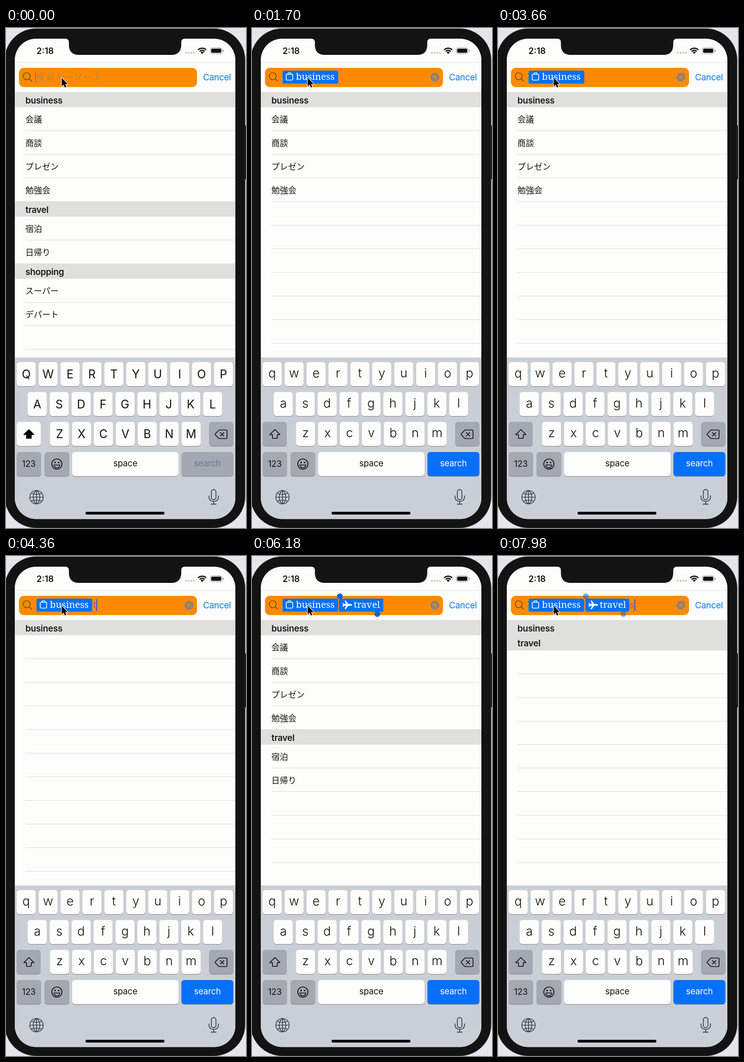
Animation of 519 by 1079 pixels, one loop 8000 ms. Source, as an HTML page with a canvas:

```html
<!DOCTYPE html>
<html lang="ja">
<head>
<meta charset="utf-8">
<title>Search tokens</title>
<style>
html, body { margin: 0; width: 100%; height: 100%; overflow: hidden; background: #e6e6ea; }
canvas { display: block; }
</style>
</head>
<body>
<canvas id="stage" width="519" height="1079"></canvas>
<script>
const c = document.getElementById('stage').getContext('2d');
const LOOP = 8000;
const SANS = 'Inter, Roboto, sans-serif';
const SERIF = '"Noto Serif", serif';
const JP = '"Noto Sans CJK JP", "Noto Sans CJK", sans-serif';
const JP_SERIF = '"Noto Serif CJK JP", "Noto Sans CJK JP", serif';
const BLUE = '#0570fa', INK = '#111', FIELD = '#ff8a00', WHITE = '#fdfdfc';

const sections = {
  business: ['会議', '商談', 'プレゼン', '勉強会'],
  travel: ['宿泊', '日帰り'],
  shopping: ['スーパー', 'デパート']
};

// blink shifts the caret phase; caret is its x position
const states = [
  { at: 0, tokens: [], text: '', caret: 64, blink: 520 },
  { at: 700, tokens: [], text: 'B', textX: 64, caret: 78.5 },
  { at: 1080, tokens: ['business'], text: '', caret: 189 },
  { at: 4000, tokens: ['business'], text: 't', textX: 188, caret: 196 },
  { at: 4450, tokens: ['business', 'travel'], text: '', selected: true },
  { at: 7900, tokens: ['business', 'travel'], text: 's', textX: 285.5, caret: 296, handlesFade: true }
];

function box(x, y, w, h, r, fill) {
  c.beginPath();
  c.roundRect(x, y, w, h, r);
  c.fillStyle = fill;
  c.fill();
}

function disc(x, y, r, fill) {
  c.beginPath();
  c.arc(x, y, r, 0, 7);
  c.fillStyle = fill;
  c.fill();
}

function label(str, x, y, font, fill = INK, align = 'left', spacing = 0) {
  c.font = font;
  c.letterSpacing = spacing + 'px';
  c.textAlign = align;
  c.fillStyle = fill;
  c.fillText(str, x, y);
}

function line(d, color, width = 1.8) {
  c.strokeStyle = color;
  c.lineWidth = width;
  c.stroke(new Path2D(d));
}

function shape(d, fill) {
  c.fillStyle = fill;
  c.fill(new Path2D(d));
}

function phone() {
  c.fillStyle = '#e6e6ea';
  c.fillRect(0, 0, 519, 1079);
  c.fillStyle = '#cfd0d9';
  c.fillRect(0, 8, 519, 1);
  box(510, 210, 9, 117, 2, '#171717');
  box(-3, 1, 520.5, 1078, 68, '#303030');
  box(-2, 2, 518.5, 1076, 67, '#131313');
}

function statusBar() {
  shape('M128 22H387V23Q379 23 379 31V36Q379 58 357 58H158Q136 58 136 36V31Q136 23 128 23Z', '#131313');
  label('2:18', 66, 56, '600 18.5px ' + SANS);
  for (let i = 0; i < 4; i++) disc(389 + i * 5.7, 53.5, 2, '#c4c4c6');
  shape('M424.3 56L420.8 52.4Q424.3 49.6 427.8 52.4Z', INK);
  for (const r of [7.8, 12.4]) {
    c.beginPath();
    c.arc(424.3, 56, r, -Math.PI * 0.75, -Math.PI * 0.25);
    c.strokeStyle = INK;
    c.lineWidth = 2.7;
    c.stroke();
  }
  c.beginPath();
  c.roundRect(441.5, 42.5, 26, 13, 4);
  c.strokeStyle = '#999';
  c.lineWidth = 1;
  c.stroke();
  box(443.5, 44.5, 22, 9, 2.3, INK);
  box(469, 46.8, 1.8, 4.5, 1, '#999');
}

function bag() {
  line('M75.5 100H86.5Q88 100 88 101.5V110Q88 112.5 85.5 112.5H76.5Q74 112.5 74 110V101.5Q74 100 75.5 100ZM77.3 100C77.3 95.4 84.7 95.4 84.7 100', '#fff', 1.6);
}

function plane() {
  shape('M216.5 105.5Q216 103.6 212.5 103.5H208L202.5 96H200.5L203 103.5H199L197.3 101.3H195.8L196.8 105.5L195.8 109.7H197.3L199 107.5H203L200.5 115H202.5L208 107.5H212.5Q216 107.4 216.5 105.5Z', '#fff');
}

const pills = {
  business: { x: 66, w: 120.5, textX: 95, icon: bag },
  travel: { x: 189, w: 95, textX: 220, icon: plane }
};

function caretAlpha(age) {
  const u = age % 1000;
  if (u < 450) return 1;
  if (u < 600) return (600 - u) / 150;
  return Math.max(0, (u - 850) / 150);
}

function handles(alpha) {
  c.globalAlpha = alpha;
  disc(190, 87, 6.3, '#1264d2');
  disc(271, 125, 6.3, '#1264d2');
  c.globalAlpha = 1;
}

function searchField(s, age) {
  c.fillStyle = '#e4e4de';
  c.fillRect(19, 74, 477, 1);
  box(28, 86, 385, 41.5, 10, FIELD);
  line('M52.4 104A7.6 7.6 0 1 1 37.2 104A7.6 7.6 0 1 1 52.4 104M50.2 109.4L56 115.2', '#80500f', 1.9);
  label('Cancel', 426, 112.5, '19px ' + SANS, '#0a7ae6', 'left', -0.35);

  const empty = !s.text && !s.tokens.length;
  if (empty) {
    label('検索キーワード', 64, 112.5, '300 20.5px ' + JP_SERIF, '#b9833f');
  } else {
    disc(395.5, 106, 9.6, '#8b8178');
    line('M391.8 102.3L399.2 109.7M399.2 102.3L391.8 109.7', FIELD, 1.5);
  }
  for (const name of s.tokens) {
    const p = pills[name];
    const square = s.selected && name === 'travel';
    box(p.x, 92, p.w, 28, square ? 0 : 4, BLUE);
    p.icon();
    label(name, p.textX, 112, '20.4px ' + SERIF, '#fff');
  }
  if (s.text) label(s.text, s.textX, 112, '20.4px ' + SERIF, '#a8559a');
  if (s.selected) {
    c.fillStyle = '#1264d2';
    c.fillRect(188.5, 92, 1.6, 28);
    handles(1);
  }
  if (s.handlesFade) handles(Math.max(0, 1 - age / 180));
  if (s.caret) {
    c.globalAlpha = caretAlpha(age + (s.blink || 0));
    box(s.caret - 1.2, 93.5, 2.4, 25, 1, '#2f66dd');
    c.globalAlpha = 1;
  }
}

function list(s) {
  const HEAD = 32.35, ROW = 50.9;
  let y = 138.7;
  const row = str => {
    if (str) label(str, 42, y + 33, '300 18px ' + JP);
    y += ROW;
    c.fillStyle = '#d9d9de';
    c.fillRect(42, Math.floor(y), 454, 1);
  };
  for (const name of s.tokens.length ? s.tokens : Object.keys(sections)) {
    c.fillStyle = '#dfdfdc';
    c.fillRect(19, Math.floor(y), 477, HEAD + 0.7);
    label(name, 42, y + 24, '600 19px ' + SANS, '#1b1b1d', 'left', -0.3);
    y += HEAD;
    if (!s.text) sections[name].forEach(row);
  }
  while (y < 690) row('');
}

function key(x, y, w, fill) {
  box(x, y + 1.3, w, 52, 6, '#8b8f95');
  box(x, y, w, 52, 6, fill);
}

function keyboard(upper) {
  const GREY = '#a3a8b2';
  c.fillStyle = '#cacfd5';
  c.fillRect(19, 711, 477, 349);
  [['qwertyuiop', 23, 721], ['asdfghjkl', 47, 785.5], ['zxcvbnm', 95.2, 850]].forEach(([letters, x0, y]) => {
    [...letters].forEach((ch, i) => {
      const x = x0 + i * 47.4;
      key(x, y, 41.3, WHITE);
      label(upper ? ch.toUpperCase() : ch, x + 20.7, y + (upper ? 35 : 33),
        (upper ? '400 25px ' : '300 27px ') + SANS, INK, 'center');
    });
  });

  key(23, 850, 52, upper ? WHITE : GREY);
  const arrow = 'M49.5 866.5L60.5 877.5H54.7V885.5H44.3V877.5H38.5Z';
  if (upper) shape(arrow, '#000');
  line(arrow, '#000', 1.5);

  key(439.5, 850, 52, GREY);
  line('M460.5 867.5H475.5Q478 867.5 478 870V883.5Q478 886 475.5 886H460.5L452.5 877.8Q452 876.8 452.5 875.8ZM463 872.5L471.5 881M471.5 872.5L463 881', INK, 1.7);

  key(23, 915, 53, GREY);
  label('123', 49.5, 947, '18px ' + SANS, INK, 'center');
  key(83.5, 915, 53.5, GREY);
  line('M121 941A11 11 0 1 1 99 941A11 11 0 1 1 121 941', INK, 1.7);
  disc(106.2, 937.8, 1.7, INK);
  disc(113.8, 937.8, 1.7, INK);
  line('M103.3 943H116.7Q115 949 110 949T103.3 943Z', INK, 1.5);
  key(143, 915, 230, WHITE);
  label('space', 258, 946, '18.5px ' + SANS, INK, 'center', -0.2);
  key(379.5, 915, 112, upper ? GREY : BLUE);
  label('search', 435.5, 946, '18.5px ' + SANS, upper ? '#747a83' : '#fff', 'center', -0.2);

  const icon = '#41464c';
  line('M80.5 1012.5A14.5 14.5 0 1 1 51.5 1012.5A14.5 14.5 0 1 1 80.5 1012.5M51.5 1012.5H80.5M66 998V1027M66 998C56.5 1004 56.5 1021 66 1027M66 998C75.5 1004 75.5 1021 66 1027M55 1004Q66 1008.5 77 1004M55 1021Q66 1016.5 77 1021', icon, 1.7);
  line('M444 1001A5 5 0 0 1 454 1001V1013A5 5 0 0 1 444 1013ZM439 1009V1012C439 1025 459.5 1025 459.5 1012V1009M449 1021.5V1027M443 1027.5H455', icon, 1.8);
  box(172, 1044, 170.5, 6, 3, '#000');
}

function draw(now) {
  const t = now % LOOP;
  const s = states.filter(s => s.at <= t).pop();
  phone();
  c.save();
  c.beginPath();
  c.roundRect(19, 23, 477, 1036.5, 46);
  c.clip();
  c.fillStyle = WHITE;
  c.fillRect(19, 23, 477, 1037);
  list(s);
  keyboard(!s.text && !s.tokens.length);
  statusBar();
  searchField(s, t - s.at);
  c.restore();

  const pointer = 'M120.5 107.5V126L124.6 122.2L127.4 128.5L130.6 127.1L127.9 121H133.3Z';
  c.lineJoin = 'round';
  line(pointer, '#fff', 2.4);
  shape(pointer, '#000');
}

const start = performance.now();
function tick() {
  draw(performance.now() - start);
  requestAnimationFrame(tick);
}
tick();
</script>
</body>
</html>
```
